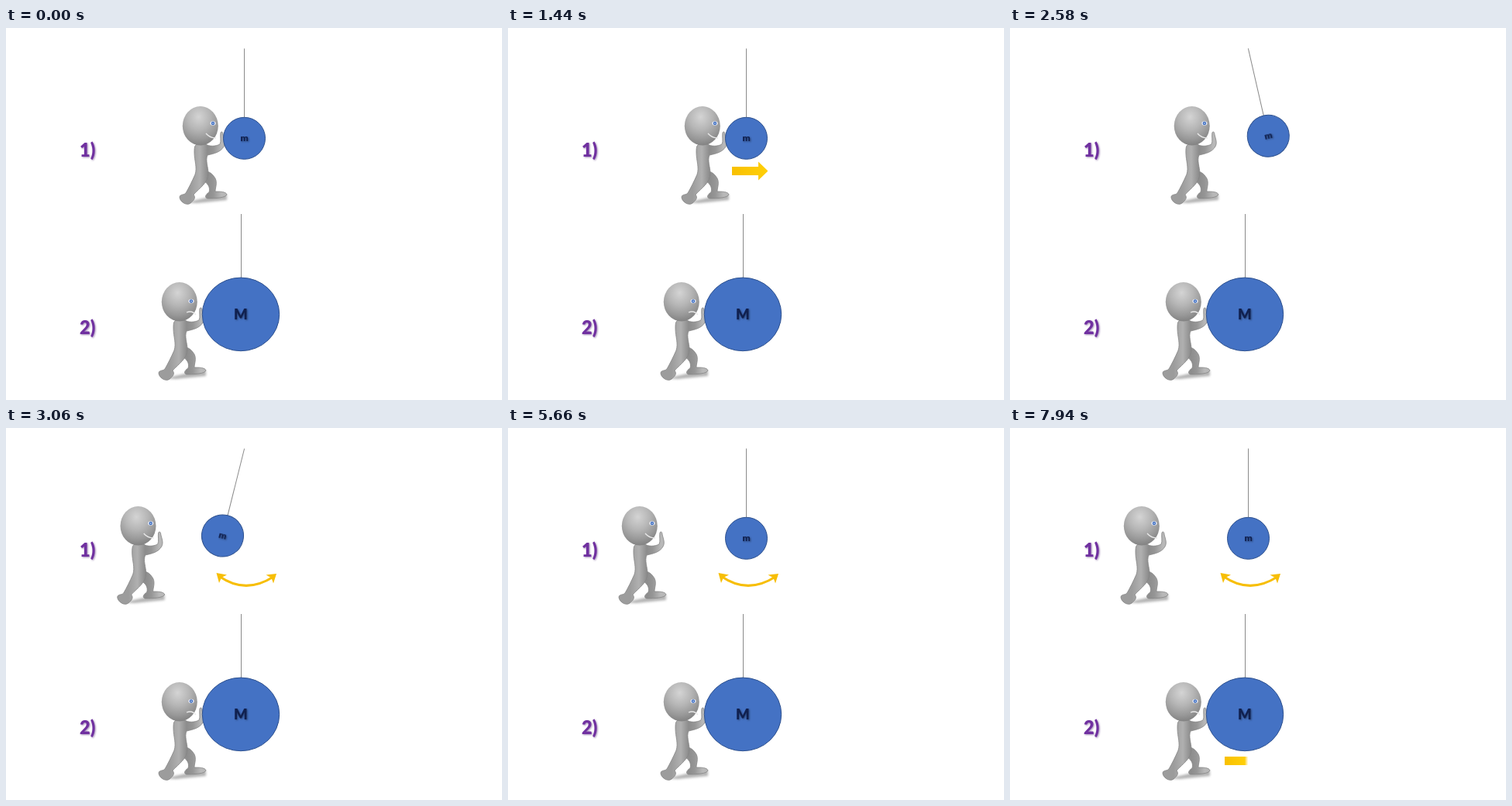
An HTML page for the animation above (8000 ms loop, 640 px wide and 480 px high).

```html
<!DOCTYPE html>
<html lang="en">
<head>
<meta charset="utf-8">
<title>Pushing two pendulums</title>
<style>
  html, body { margin: 0; width: 100%; height: 100%; overflow: hidden; background: #fff; }
  svg { display: block; width: 640px; height: 480px; }
  text { font-family: Lato, "Open Sans", sans-serif; font-weight: 900; }
  .label { font-size: 23.5px; fill: #7030a0; filter: drop-shadow(1.5px 1.5px 1px #a48cb8); }
  .mass { fill: #10204f; text-anchor: middle; filter: drop-shadow(1px 1px 1px #0006); }
  .string { stroke: #8a8a8a; stroke-width: 1; }
  .ball { fill: #4472c4; stroke: #2f528f; stroke-width: 1; }
  .gold { fill: none; stroke: #f7be05; stroke-width: 3; }
  .tip { fill: #f7be05; }
  .mouth { fill: none; stroke: #e8e8e8; stroke-width: 1.3; }
</style>
</head>
<body>
<svg viewBox="0 0 640 480">
  <defs>
    <radialGradient id="headFill" cx=".45" cy=".27" r=".72">
      <stop offset="0" stop-color="#d4d4d4"/>
      <stop offset=".45" stop-color="#b6b6b6"/>
      <stop offset=".8" stop-color="#989898"/>
      <stop offset="1" stop-color="#848484"/>
    </radialGradient>
    <linearGradient id="bodyFill" gradientUnits="userSpaceOnUse" x1="238" y1="0" x2="278" y2="0">
      <stop offset="0" stop-color="#9c9c9c"/>
      <stop offset=".3" stop-color="#b0b0b0"/>
      <stop offset=".55" stop-color="#8c8c8c"/>
      <stop offset=".75" stop-color="#969696"/>
      <stop offset="1" stop-color="#b8b8b8"/>
    </linearGradient>
    <linearGradient id="wipe" gradientUnits="userSpaceOnUse" x1="289" y1="0" x2="335" y2="0">
      <stop stop-color="#f8c000"/>
      <stop id="solid" stop-color="#ffcf08"/>
      <stop id="clear" stop-color="#ffd030" stop-opacity="0"/>
    </linearGradient>
    <filter id="soft" x="-20%" y="-100%" width="140%" height="300%">
      <feGaussianBlur stdDeviation="1.6"/>
    </filter>
    <g id="person">
      <path d="M232 225 L262 218 L285 215 L285 222 L246 226Z" fill="#b4b4b4" filter="url(#soft)"/>
      <g fill="url(#bodyFill)" stroke="#848484" stroke-width=".8">
        <path d="M253 188 C259 182 266 187 270 194 C273 200 270 206 270 211
                 C276 211 284 211 285 215 C284 219 270 220 260 220
                 C256 219 257 215 262 212 C264 205 260 200 254 197Z"/>
        <path d="M246 150 L258 150 C262 153 270 153 276 150 C278 146 276 140 277 135
                 C278 133 280 134 280 137 C281 142 284 148 281 153
                 C277 160 269 162 260 164 C257 171 261 180 261 187
                 C261 200 250 206 242 215 C245 219 243 222 238 226
                 C233 230 224 224 224 218 C225 214 229 216 232 213
                 C236 206 240 198 244 189 C247 180 243 171 243 161 C243 155 243 152 246 150Z"/>
      </g>
      <ellipse cx="250.8" cy="126.3" rx="23" ry="25.2" fill="url(#headFill)"/>
    </g>
    <g id="eye">
      <ellipse rx="3.6" ry="2.8" fill="#e4e8f4"/>
      <circle r="2.2" fill="#3f6fc0"/>
      <circle r=".8" fill="#dce8ff"/>
    </g>
  </defs>

  <text class="label" x="95" y="165.5">1)</text>
  <text class="label" x="95" y="394.5">2)</text>

  <g id="pusher">
    <use href="#person"/>
    <use href="#eye" x="267" y="123"/>
    <path class="mouth" d="M258 136 Q263 142 271 142"/>
  </g>
  <g transform="translate(-27 227)">
    <use href="#person"/>
    <use href="#eye" x="266" y="125.5"/>
    <path class="mouth" d="M260 140 Q267 137 272 143"/>
  </g>

  <g id="pendulum">
    <path class="string" d="M307.5 26.5V116"/>
    <circle class="ball" cx="307.5" cy="142.3" r="27"/>
    <text class="mass" x="307.5" y="146" font-size="12">m</text>
  </g>
  <path class="string" d="M303.5 240V323"/>
  <ellipse class="ball" cx="303" cy="369.4" rx="49.7" ry="47.3"/>
  <text class="mass" x="303" y="376" font-size="18.5">M</text>

  <path id="arrow" d="M289 179H323V172.5L335.5 184.5L323 196.5V190H289Z" fill="url(#wipe)"/>
  <g id="swing">
    <path class="gold" d="M275.5 191.5 Q309 215 345 192"/>
    <path class="tip" d="M271.5 187L285 189.5L278 193L275 200Z"/>
    <path class="tip" d="M349 188L335.5 189.5L342.5 193.5L345 200.5Z"/>
  </g>
</svg>
<script>
const $ = id => document.getElementById(id);
const LOOP = 8000;
const PUSH = 1470, PEAK = 2040, RETREAT = 2110, CROSS = 2810, SWING = 3000;
// The later swing advances in held steps of a twelfth of a period.
const STEPS = [3440, 3700, 3960, 4220, 4420, 4680, 4940, 5200,
               5460, 5660, 5920, 6180, 6440, 6700, 6900, 7160];

const progress = (t, start, length) => Math.min(1, Math.max(0, (t - start) / length));
const ease = u => (1 - Math.cos(Math.PI * u)) / 2;

function angle(t) {
  if (t < PEAK) return 36 * Math.sin(progress(t, PUSH, PEAK - PUSH) * Math.PI / 2);
  if (t < 2520) return 36 * Math.cos((t - PEAK) / 750 * Math.PI / 2) ** 1.3;
  const n = STEPS.filter(s => s <= t).length;
  if (n) return -28 * Math.cos((n - 1) * Math.PI / 6);
  return -28 * Math.sin((Math.min(t, 3240) - CROSS) / SWING * 2 * Math.PI);
}

function draw() {
  const t = performance.now() % LOOP;
  const shift = 38 * ease(progress(t, PUSH, 530)) - 119 * ease(progress(t, RETREAT, 1000));
  $("pusher").setAttribute("transform", `translate(${shift} 0)`);
  $("pendulum").setAttribute("transform", `rotate(${-angle(t)} 307 27)`);

  const second = t > 7640;
  const edge = progress(t, second ? 7640 : 500, 500) * 1.1;
  $("solid").setAttribute("offset", Math.max(0, edge - 0.1));
  $("clear").setAttribute("offset", edge);
  $("arrow").setAttribute("transform", second ? "translate(-12 245)" : "");
  $("arrow").style.display = edge > 0 && (t < 1500 || second) ? "" : "none";
  $("swing").style.display = t >= 2600 ? "" : "none";
  requestAnimationFrame(draw);
}
draw();
</script>
</body>
</html>
```
